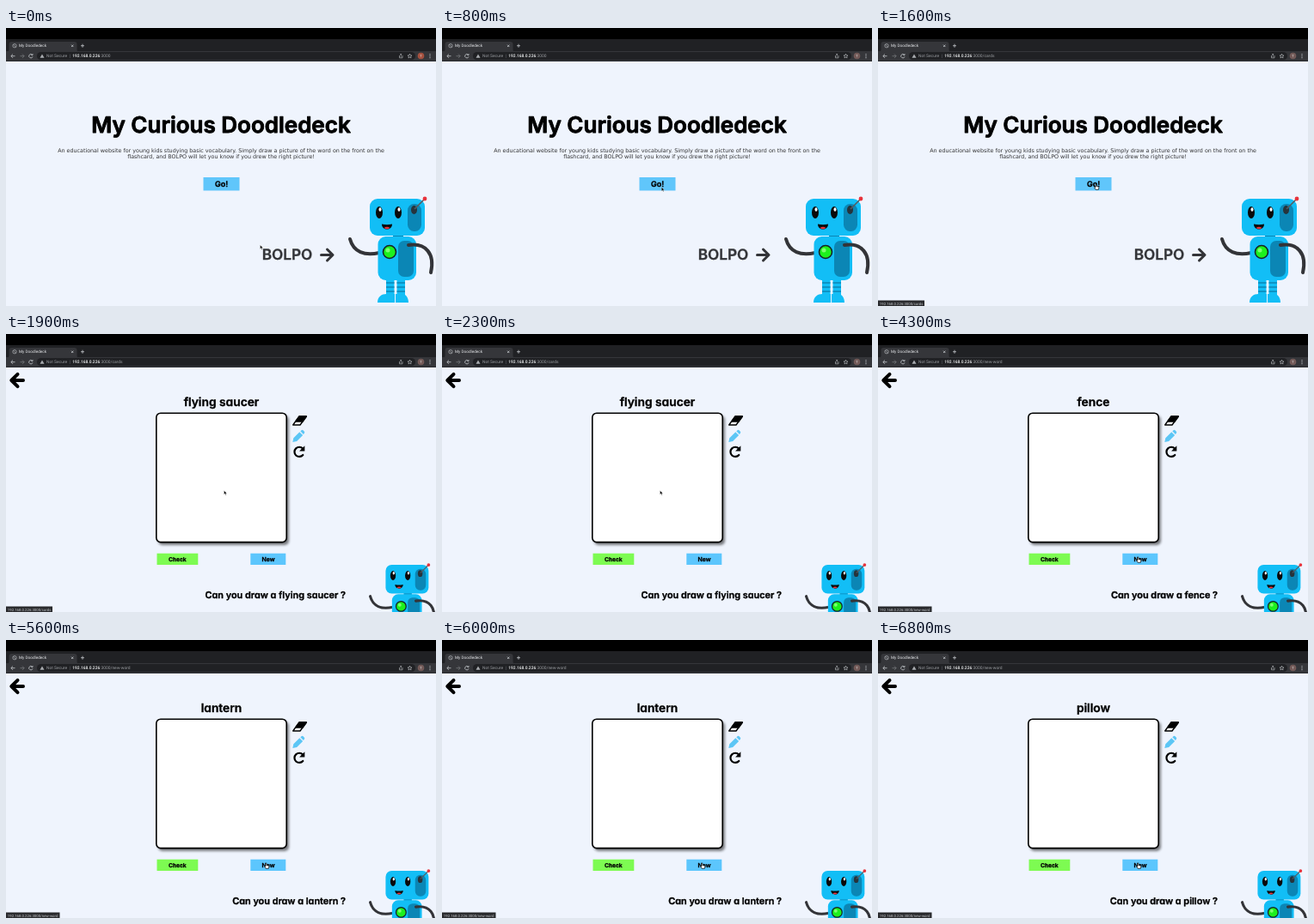
An HTML page that plays this animation: 500x324 px, repeating every 8 s.

```html
<!DOCTYPE html>
<html lang="en">
<head>
<meta charset="utf-8">
<title>My Doodledeck</title>
<style>
  html, body { margin: 0; width: 100%; height: 100%; overflow: hidden; background: #eff4fd; }
  svg { display: block; width: 100vw; height: 100vh; }
  text { text-rendering: geometricPrecision; white-space: pre; }
  .ui { font-family: Roboto, sans-serif; font-size: 4.9px; fill: #9a9da1; }
  .body { font: 6.375px "DejaVu Sans", sans-serif; fill: #333; text-anchor: middle; }
  .hand {
    font-family: Inter, sans-serif; font-weight: 600; font-feature-settings: "cv11";
    fill: #000; stroke: #000; stroke-width: .35; stroke-linejoin: round; text-anchor: middle;
  }
</style>
</head>
<body>
<svg viewBox="0 0 500 324" preserveAspectRatio="none">
  <defs>
    <filter id="soft" x="-10%" y="-10%" width="120%" height="120%"><feGaussianBlur stdDeviation="1.6"/></filter>
    <g id="buddy">
      <path d="M434 262C417 266 404 261 400 246" fill="none" stroke="#333438" stroke-width="4" stroke-linecap="round"/>
      <path d="M450 240h12v6h-12z" fill="#0b86b5"/>
      <path d="M442 292h9.5v20h-9.5zM454.5 292h9.5v20h-9.5z" fill="#12bef6"/>
      <path d="M442 297h9.5M442 302h9.5M442 307h9.5M454.5 297h9.5M454.5 302h9.5M454.5 307h9.5" stroke="#0b86b5" stroke-width="1.3"/>
      <path d="M432 320c0-7 5-10 10-10h10v10zM453 320v-10h7c5 0 8 4 8 10z" fill="#12bef6"/>
      <rect x="432.5" y="243" width="44.5" height="51" rx="9" fill="#12bef6"/>
      <rect x="456" y="248" width="18" height="42" rx="7" fill="#0b86b5"/>
      <path d="M468 253C488 250 499 263 494 285" fill="none" stroke="#333438" stroke-width="4" stroke-linecap="round"/>
      <circle cx="446" cy="261" r="7.5" fill="#1df01d" stroke="#16222a" stroke-width="1.6"/>
      <circle cx="444" cy="259" r="2.5" fill="#7dff70"/>
      <rect x="423" y="199" width="64" height="43" rx="9" fill="#12bef6"/>
      <rect x="467" y="205" width="16" height="32" rx="7.5" fill="#0b86b5"/>
      <ellipse cx="474.5" cy="212" rx="3.5" ry="5" fill="#26343c"/>
      <path d="M475 211L486.5 199.5" stroke="#555b60" stroke-width="1.6"/>
      <circle cx="487" cy="199" r="2.4" fill="#e8333c"/>
      <g fill="#0a0a0a">
        <ellipse cx="434" cy="215" rx="4" ry="7"/>
        <ellipse cx="456" cy="215" rx="4" ry="7"/>
        <path d="M437 228.5q6 1.5 12 0c0 8-12 8-12 0z"/>
      </g>
      <g fill="#fff">
        <ellipse cx="435" cy="211.5" rx="1.5" ry="2.3"/>
        <ellipse cx="457" cy="211.5" rx="1.5" ry="2.3"/>
      </g>
      <path d="M439.5 233q3.5-2.5 7 0q-3.5 2.5-7 0z" fill="#e8333c"/>
    </g>
  </defs>

  <rect width="500" height="324" fill="#eff4fd"/>

  <g id="home">
    <text class="hand" x="250" y="122" font-size="26" style="stroke-width:.9">My Curious Doodledeck</text>
    <text class="body" x="250" y="144.7">An educational website for young kids studying basic vocabulary. Simply draw a picture of the word on the front on the</text>
    <text class="body" x="250" y="152.3">flashcard, and BOLPO will let you know if you drew the right picture!</text>
    <rect x="229.5" y="174" width="42" height="15.5" fill="#60c6fb"/>
    <text class="hand" x="250.5" y="185.3" font-size="9">Go!</text>
    <text class="hand" x="327" y="270.3" font-size="17.2" style="fill:#333438;stroke:#333438">BOLPO</text>
    <path d="M366.5 264.5H379M373.5 258L380 264.5L373.5 271" fill="none" stroke="#333438" stroke-width="3" stroke-linejoin="round" stroke-linecap="round"/>
    <use href="#buddy"/>
  </g>

  <g id="cards">
    <path d="M20 54H7M13.5 46.8L6.3 54L13.5 61.2" fill="none" stroke="#000" stroke-width="4" stroke-linejoin="round" stroke-linecap="round"/>
    <text id="word" class="hand" x="250.5" y="83.8" font-size="13.8"></text>
    <rect x="177" y="95" width="152" height="151" rx="5" fill="#000" opacity=".5" filter="url(#soft)"/>
    <rect x="174.8" y="92.2" width="151.4" height="150.4" rx="5" fill="#fff" stroke="#000" stroke-width="1.6"/>
    <path d="M341 96h8.3l-7.3 10h-8.3z" fill="#fff" stroke="#000" stroke-width="1.4" stroke-linejoin="round"/>
    <path d="M341 96h8.3l-4.3 6h-8.3z" fill="#000" stroke="#000" stroke-width="1.4" stroke-linejoin="round"/>
    <path d="M333.3 126l1-4.7l7-7l3.8 3.8l-7 7zM342.3 113.3l1.5-1.3q1-.5 1.8.3l1.3 1.4q.8.9 0 1.8l-1 1.4z" fill="#5cc6f5"/>
    <path d="M345.2 133.6A5.6 5.6 0 1 0 345.3 141" fill="none" stroke="#000" stroke-width="2.2" stroke-linecap="round"/>
    <path d="M347.3 130.3v6.2h-6.2z" fill="#000"/>
    <rect x="175.5" y="255.7" width="47.8" height="13.3" fill="#7dfb52"/>
    <text class="hand" x="199.3" y="264.9" font-size="6.7">Check</text>
    <rect x="284.3" y="255.7" width="41" height="13.3" fill="#5cc6fd"/>
    <text class="hand" x="305" y="264.9" font-size="6.9">New</text>
    <text id="ask" class="hand" x="395" y="307.8" font-size="10.9" style="text-anchor:end"></text>
    <use href="#buddy" transform="translate(111.5 113.8) scale(.78)"/>
  </g>

  <g id="chrome">
    <rect width="500" height="39" fill="#202124"/>
    <rect width="500" height="13" fill="#000"/>
    <path d="M1 27.5q2.5 0 2.5-2.5v-6q0-3 3-3h73q3 0 3 3v6q0 2.5 2.5 2.5z" fill="#35363a"/>
    <rect y="27" width="500" height="11.5" fill="#35363a"/>
    <rect x="36" y="28" width="440" height="9.3" rx="4.65" fill="#202124"/>
    <g id="icon" fill="none" stroke="#b4b7bb" stroke-width=".7"><circle cx="10" cy="20.7" r="2.2"/><path d="M8.5 19.2l3 3"/></g>
    <path id="spin" d="M10 18.5a2.2 2.2 0 1 1-2.2 2.2" fill="none" stroke="#8ab4f8" stroke-width=".8"/>
    <text class="ui" x="15" y="22.4" style="fill:#e4e6e9;font-size:4.7px">My Doodledeck</text>
    <g fill="none" stroke="#c6c9cd" stroke-width=".8">
      <path d="M76 19.6l2.4 2.4M78.4 19.6l-2.4 2.4M87 20.7h4M89 18.7v4"/>
      <path d="M10.5 32.7h-4.5M8 30.5l-2.2 2.2l2.2 2.2"/>
      <path d="M16.5 32.7h4.5M19 30.5l2.2 2.2l-2.2 2.2" stroke="#77797d"/>
      <path d="M30.6 31.3a2.2 2.2 0 1 0 .4 2M31 30v1.6h-1.7"/>
      <path d="M457.5 32v2.8h3.5V32M459.2 33.5v-3.5M458.2 31l1-1l1 1" stroke-width=".6"/>
      <path d="M469.5 30.2l.7 1.7l1.8.1l-1.4 1.2l.5 1.8l-1.6-1l-1.6 1l.5-1.8l-1.4-1.2l1.8-.1z" stroke-width=".6"/>
    </g>
    <path d="M42 30.4l2.5 4.4h-5z" fill="#a9acb0"/>
    <text class="ui" x="47" y="34.4">Not Secure</text>
    <path d="M74.4 30.5v4.5" stroke="#606368" stroke-width=".5"/>
    <text class="ui" x="77.3" y="34.4"><tspan fill="#f1f3f4" font-weight="500">192.168.0.226</tspan><tspan id="path"></tspan></text>
    <circle id="avatar" cx="482.5" cy="32.5" r="3.8"/>
    <text class="ui" x="482.5" y="34" text-anchor="middle" style="fill:#eee;font-size:4px">T</text>
    <g fill="#c6c9cd"><circle cx="493" cy="30.7" r=".6"/><circle cx="493" cy="32.7" r=".6"/><circle cx="493" cy="34.7" r=".6"/></g>
  </g>

  <g id="status">
    <rect id="statusBox" y="317.5" height="7" fill="#292a2d"/>
    <text id="statusText" class="ui" x="1.8" y="322.5" style="fill:#c4c7ca;font-size:4.3px"></text>
  </g>

  <path id="arrow" d="M0 0v4.6l1.1-1l.8 1.7l.8-.4l-.8-1.6h1.5z" fill="#000" stroke="#fff" stroke-width=".35"/>
  <path id="pointer" d="M-.6 0q.6-.7 1.2 0v2l2.2.6q.7.3.6 1l-.5 2.2h-3.2l-1.6-2.2q0-.9 1.3-.2z" fill="#fff" stroke="#000" stroke-width=".7" stroke-linejoin="round"/>
</svg>
<script>
const LOOP = 8000;
const el = {};
for (const node of document.querySelectorAll("svg [id]")) el[node.id] = node;

// [start, value] tables hold their value until the next row.
const words = [[0, "flying saucer"], [4200, "fence"], [5600, "lantern"], [6700, "pillow"]];
const paths = [[0, ":3000"], [1600, ":3000/cards"], [4200, ":3000/new-word"]];
const hints = [[0, "cards", 54], [3000, "new-word", 62.5]];
const loads = [[4100, 4300], [6700, 6800]];
// [time, x, y]
const moves = [[0, 295.5, 253], [100, 295.5, 253], [900, 253.5, 182.5], [3000, 253.5, 182.5], [3500, 302.5, 260.5]];

const at = (rows, t) => rows.filter(r => r[0] <= t).pop();
const ramp = (t, a, b) => Math.min(1, Math.max(0, (t - a) / (b - a)));
const ease = k => k * k * (3 - 2 * k);
const show = (node, on) => node.style.display = on ? "" : "none";
const write = (node, s) => { if (node.textContent !== s) node.textContent = s; };

function cursor(t) {
  const i = moves.findIndex(m => m[0] > t);
  if (i < 0) return moves[moves.length - 1].slice(1);
  const [a, b] = [moves[i - 1], moves[i]];
  const k = ease(ramp(t, a[0], b[0]));
  return [a[1] + (b[1] - a[1]) * k, a[2] + (b[2] - a[2]) * k];
}

function draw(t) {
  const onCards = t >= 1900;
  show(el.home, !onCards);
  show(el.cards, onCards);

  const word = at(words, t)[1];
  write(el.word, word);
  write(el.ask, `Can you draw a ${word} ?`);
  write(el.path, at(paths, t)[1]);
  el.avatar.setAttribute("fill", t < 500 ? "#a5513f" : "#735a58");

  const loading = loads.some(([a, b]) => t >= a && t < b);
  show(el.icon, !loading);
  show(el.spin, loading);
  el.spin.setAttribute("transform", `rotate(${t * .36} 10 20.7)`);

  const [, page, width] = at(hints, t);
  el.statusBox.setAttribute("width", width);
  write(el.statusText, `192.168.0.226:3000/${page}`);
  el.status.style.opacity = t < 3000 ? ramp(t, 950, 1250) - ramp(t, 2000, 2300) : ramp(t, 3600, 3800);

  const hover = t >= 900 && t < 1900 || t >= 3400;
  const [x, y] = cursor(t);
  show(el.arrow, !hover);
  show(el.pointer, hover);
  (hover ? el.pointer : el.arrow).setAttribute("transform", `translate(${x} ${y})`);
}

const start = performance.now();
function tick() {
  draw((performance.now() - start) % LOOP);
  requestAnimationFrame(tick);
}
tick();
</script>
</body>
</html>
```
